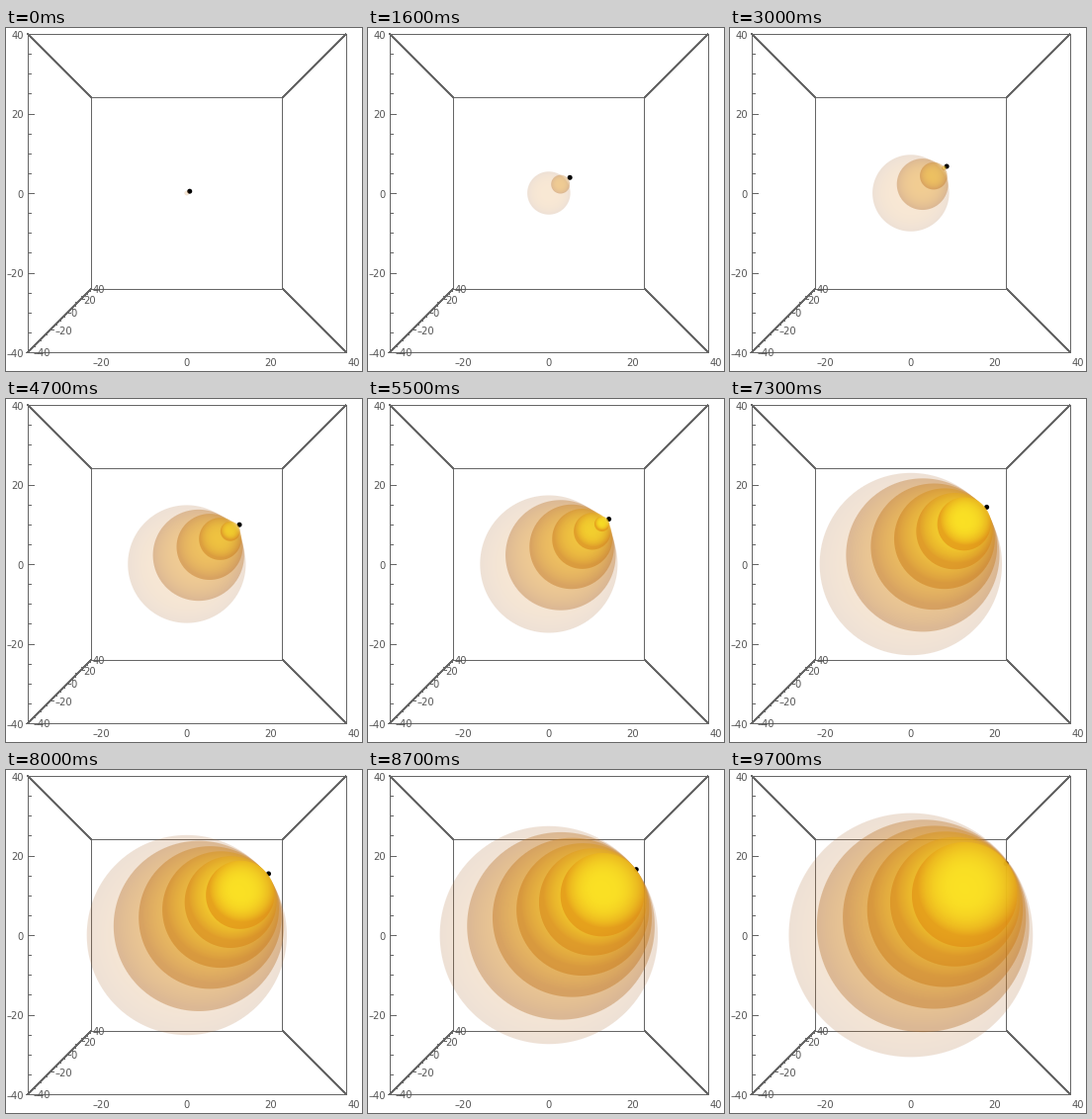
These frames come from a looping animation (360x347 px, 9.8 s). A matplotlib script:

```python
import numpy as np
import matplotlib.pyplot as plt
from matplotlib.animation import FuncAnimation
from matplotlib.patches import Circle

W, H, DPI = 360, 347, 100
PX = 72 / DPI                 # points per pixel
CX, CY = 182.85, 167.0        # vanishing point
FOCAL, DIST = 483.0, 160.0    # pixels, distance to the box centre
FRAMES, STEP_MS = 98, 100
VEL = np.array([1.0, 0.755, 1.0])   # right, up, away from the viewer
WAVES, GAP = 6, 4.0           # wave fronts and the time between them
HALF = 40                     # half the box side
GREY, TEXT = "#666666", "#555555"

cols, rows = np.meshgrid(np.arange(W) + 0.5, np.arange(H) + 0.5)
RAY_X, RAY_Y = (cols - CX) / FOCAL, (CY - rows) / FOCAL
RAY_LEN = np.sqrt(RAY_X ** 2 + RAY_Y ** 2 + 1)


def project(x, y, away):
    s = FOCAL / (DIST + away)
    return CX + s * x, CY - s * y


def blend(a, b, k):
    return np.array(a) * (1 - k) + np.array(b) * k


def ray_distance(c):
    """Distance of every pixel's view ray from the point c."""
    x, y, z = c[0], c[1], c[2] + DIST
    a = y - z * RAY_Y
    b = z * RAY_X - x
    k = x * RAY_Y - y * RAY_X
    return np.sqrt(a * a + b * b + k * k) / RAY_LEN


def render(t):
    rgb = np.zeros((H, W, 3))
    alpha = np.zeros((H, W, 1))
    for i in range(WAVES):
        start = GAP * i
        r = t - start
        if r <= 0.05:
            break
        c = VEL * start
        size = FOCAL * r / np.sqrt((DIST + c[2]) ** 2 - r * r)
        cover = np.clip((1 - ray_distance(c) / r) * size + 0.5, 0, 1)

        # later fronts are denser and go from brown to yellow
        k = i / (WAVES - 1)
        middle = blend((225, 142, 42), (255, 238, 28), k)
        rim = blend((170, 104, 48), (224, 138, 16), k)
        lit = c + r * 0.2 * k * np.array([0.5, 1.0, 0.0])
        shade = np.clip(ray_distance(lit) / r, 0, 1)[..., None] ** 3
        colour = blend(middle, rim, shade) / 255

        a = (0.2 + 0.4 * np.sqrt(k)) * cover[..., None]
        rgb = blend(rgb, colour, a)
        alpha = blend(alpha, 1, a)
    return np.concatenate([rgb / np.maximum(alpha, 1e-6), alpha], axis=2)


fig = plt.figure(figsize=(W / DPI, H / DPI), dpi=DPI, facecolor="white")
ax = fig.add_axes([0, 0, 1, 1])
ax.axis("off")


def line(x0, y0, x1, y1):
    ax.plot([x0, x1], [y0, y1], color=GREY, lw=0.9 * PX, zorder=1,
            solid_capstyle="butt", antialiased=False)


def label(x, y, value, align):
    text = f"\u2013{-value}" if value < 0 else str(value)
    ax.text(x, y, text, size=10 * PX, color=TEXT, family="DejaVu Sans",
            ha=align, va="center_baseline", zorder=1)


# box
corners = [(-HALF, -HALF), (HALF, -HALF), (HALF, HALF), (-HALF, HALF)]
for p, q in zip(corners, corners[1:] + corners[:1]):
    for depth in (-HALF, HALF):
        line(*project(*p, depth), *project(*q, depth))
    line(*project(*p, -HALF), *project(*p, HALF))

# ticks and labels on the left, bottom and receding edges
for v in range(-HALF, HALF + 1, 5):
    major = v % 20 == 0
    x, y = project(-HALF, v, -HALF)
    line(x, y, x + (6 if major else 3.5), y)
    dx, dy = project(-HALF, -HALF, v)
    line(dx - 2, dy, dx + (3 if major else 1), dy)
    if major:
        label(18, y + 0.7, v, "right")
        label(dx + 3.5 - v / 20, dy + 0.5, v, "left")
        if v > -HALF:
            minus = 2.5 if v < 0 else 0
            label(CX + 4.225 * v - minus, 338.5, v, "center")

dot = ax.add_patch(Circle((CX, CY), 2.5, color="black", lw=0, zorder=2))
waves = ax.imshow(np.zeros((H, W, 4)), extent=(0, W, H, 0), aspect="auto",
                  interpolation="nearest", zorder=3)
ax.set_xlim(0, W)
ax.set_ylim(H, 0)


def update(n):
    t = 0.4 * (n + 2)
    x, y = project(*(VEL * t))
    dot.center = x + 0.5, y
    waves.set_data(render(t))
    return dot, waves


anim = FuncAnimation(fig, update, frames=FRAMES, interval=STEP_MS,
                     repeat=True, repeat_delay=0)
plt.show()
```
